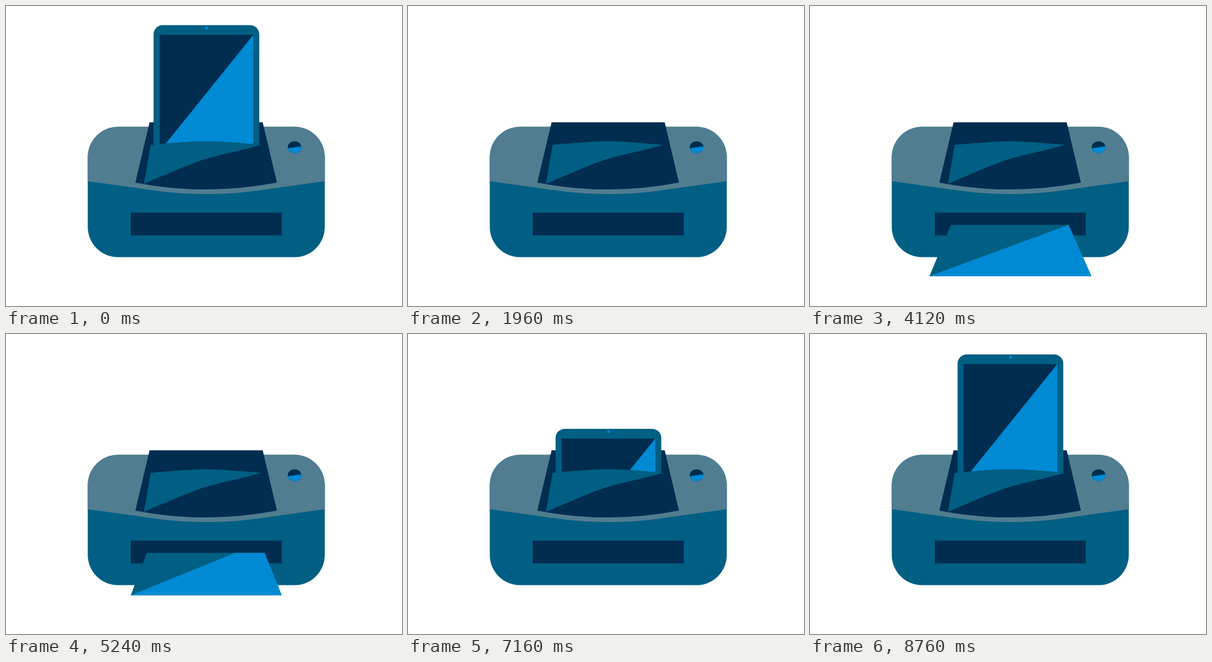
Write an HTML page that moves like this. It is 695x525 px and loops after 8800 ms.

```html
<!DOCTYPE html>
<html lang="en">
<head>
<meta charset="utf-8">
<title>Printer</title>
<style>
  html, body { margin: 0; width: 100%; height: 100%; overflow: hidden; background: #fff; }
  svg { display: block; width: 100vw; height: 100vh; }
  .teal { fill: #005f83; }
  .grey { fill: #507d90; }
  .navy { fill: #002d50; }
  .blue { fill: #008ad4; }
  .seam { fill: none; stroke: #005f83; stroke-width: .5; opacity: .25; }
</style>
</head>
<body>
<svg viewBox="0 0 695 525">
  <defs>
    <clipPath id="aboveLip">
      <path d="M0 0H695V243H448C400 239 380 237 350 237C330 237 310 238 254 243H0Z"/>
    </clipPath>
    <clipPath id="bodyShape">
      <rect x="143.5" y="211.5" width="416" height="228" rx="53"/>
    </clipPath>
    <clipPath id="buttonShape">
      <ellipse cx="506.5" cy="247.2" rx="12" ry="10.5"/>
    </clipPath>
  </defs>

  <g clip-path="url(#bodyShape)">
    <rect class="teal" x="140" y="200" width="424" height="245"/>
    <path class="grey" d="M140 200H564V306L488 316.5C433 324.5 403 329 351.5 329C300 329 270 324.5 215 316.5L140 306Z"/>
  </g>

  <g clip-path="url(#buttonShape)">
    <rect class="navy" x="490" y="232" width="34" height="30"/>
    <path class="blue" d="M490 249.6L523 245V262H490Z"/>
  </g>

  <path class="navy" d="M252 203.5H450.5L475.5 309Q351.5 333 227 309Z"/>

  <g clip-path="url(#aboveLip)">
    <g id="tablet">
      <path class="teal" d="M259 300V16A16 16 0 0 1 275 0H428.5A16 16 0 0 1 444.5 16V300Z"/>
      <path class="navy" d="M269.5 17H434V300H269.5Z"/>
      <path class="blue" d="M434 17V300H269.5V220.6Z"/>
      <circle class="blue" cx="352" cy="5" r="2.5"/>
    </g>
  </g>

  <path class="teal" d="M254 243C310 238 330 237 350 237C380 237 400 239 448 243C408 254 363 263 340 271C315 280 285 293 242 311Z"/>
  <path class="seam" d="M448 243L462 310"/>

  <rect class="navy" x="219" y="361.5" width="265" height="40"/>
  <path class="seam" d="M252 382.5H452"/>
  <path id="sheet" class="teal"/>
  <path id="shine" class="blue"/>
</svg>

<script>
const LOOP = 8800, SLOT_Y = 383, SHEET_LENGTH = 99;
const SLIDE_END = 3818, SWAY_END = 4250;
const [tablet, sheet, shine] = ["tablet", "sheet", "shine"].map(id => document.getElementById(id));

// Time and sheet length out of the slot; equal neighbours are pauses
const feed = [[1960, 0], [2400, 21], [2600, 21], [2800, 40], [3000, 40],
              [3200, 59], [3400, 59], [SLIDE_END, SHEET_LENGTH]];

function fedLength(t) {
  if (t <= feed[0][0]) return 0;
  const i = feed.findIndex(([time]) => t < time);
  if (i < 0) return SHEET_LENGTH;
  const [t0, a] = feed[i - 1], [t1, b] = feed[i];
  return a + (b - a) * (t - t0) / (t1 - t0);
}

// Once out, the free edge sways up and down before it rests
function sway(t) {
  const u = (t - SLIDE_END) / (SWAY_END - SLIDE_END);
  return u <= 0 || u >= 1 ? 0 : 19 * Math.exp(-0.955 * u) * Math.sin(2 * Math.PI * u);
}

function tabletTop(t) {
  const drop = t < LOOP / 2
    ? 14.8 * (Math.exp(0.0014 * t) - 1)
    : 144.5 * Math.exp(-0.00145 * (t - 7160)) - 12;
  return 33.6 + Math.min(drop, 320);
}

function draw(t) {
  tablet.setAttribute("transform", `translate(0 ${tabletTop(t)})`);

  const phase = Math.min(t, LOOP - t);
  const length = fedLength(phase);
  const bottom = SLOT_Y + length + sway(phase);
  const left = 247 - 0.377 * length, right = 454 + 0.402 * length;
  const split = 247 + 207 * length / SHEET_LENGTH;
  sheet.setAttribute("d", length ? `M247 ${SLOT_Y}H454L${right} ${bottom}H${left}Z` : "");
  shine.setAttribute("d", length ? `M${split} ${SLOT_Y}H454L${right} ${bottom}H${left}Z` : "");
}

const start = performance.now();
function tick() {
  draw((performance.now() - start) % LOOP);
  requestAnimationFrame(tick);
}
tick();
</script>
</body>
</html>
```
